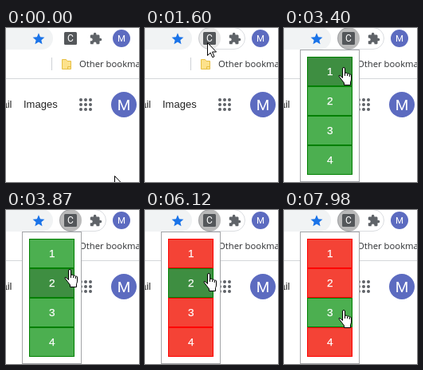
These frames come from a looping animation (167 by 193 pixels, 8000 ms). An HTML page:

```html
<!DOCTYPE html>
<html lang="en">
<head>
<meta charset="utf-8">
<title>Extension popup</title>
<style>
  html, body { margin: 0; width: 100%; height: 100%; overflow: hidden; background: #fff; }
  svg { display: block; width: 100vw; height: 100vh; }
  .ui { font: 11.3px "Open Sans", "Noto Sans", sans-serif; fill: #2b2d30; }
  .page { font: 13px "Liberation Sans", Arial, sans-serif; fill: #222; }
  .letter { font-family: Roboto, sans-serif; fill: #fff; text-anchor: middle; }
  .digit { font: 13.6px "Liberation Sans", Arial, sans-serif; fill: #fff; stroke: #fff; stroke-width: .25; text-anchor: middle; }
  .crisp { shape-rendering: crispEdges; }
</style>
</head>
<body>
<svg viewBox="0 0 167 193">
  <rect width="167" height="193" fill="#fff"/>

  <!-- toolbar -->
  <rect x="-40" y="-1" width="99" height="28" rx="14" fill="#f1f3f4"/>
  <path transform="translate(32.1 4.8) scale(.74)" fill="#1a73e8"
    d="M12 17.27 18.18 21l-1.64-7.03L22 9.24l-7.19-.61L12 2 9.19 8.63 2 9.24l5.46 4.73L5.82 21z"/>
  <rect id="pill" x="67.5" y="-.5" width="58" height="27" rx="13.5" fill="#fff" stroke="#dadce0"/>
  <circle id="ink" cx="81" cy="13" r="14" fill="#000"/>
  <rect x="73" y="5" width="16" height="16" rx="1.5" fill="#54575a"/>
  <text class="letter" x="81" y="17.3" font-size="12">C</text>
  <path transform="translate(104.4 5.1) scale(.69)" fill="#5f6368"
    d="M20.5 11H19V7c0-1.1-.9-2-2-2h-4V3.5C13 2.12 11.88 1 10.5 1S8 2.12 8 3.5V5H4c-1.1 0-1.99.9-1.99 2v3.8H3.5c1.49 0 2.7 1.21 2.7 2.7s-1.21 2.7-2.7 2.7H2V20c0 1.1.9 2 2 2h3.8v-1.5c0-1.49 1.21-2.7 2.7-2.7 1.49 0 2.7 1.21 2.7 2.7V22H17c1.1 0 2-.9 2-2v-4h1.5c1.38 0 2.5-1.12 2.5-2.5S21.88 11 20.5 11z"/>
  <circle cx="145" cy="13" r="11" fill="#5c6bc0"/>
  <text class="letter" x="145" y="17" font-size="11.5">M</text>

  <!-- bookmarks bar -->
  <rect class="crisp" x="57" y="37" width="1" height="16" fill="#cfd2d6"/>
  <path d="M70.5 39.5h5l1.5 2h4.5v10h-11z" fill="#fde28c" stroke="#e6bf45"/>
  <path d="M77.5 51.5v-3h4" fill="none" stroke="#e6bf45"/>
  <text class="ui" x="92" y="49">Other bookmarks</text>
  <rect class="crisp" y="63" width="167" height="1" fill="#d5d7da"/>

  <!-- page header -->
  <text class="page" x="7.5" y="100" text-anchor="end">ail</text>
  <text class="page" x="22" y="100">Images</text>
  <g id="dots" fill="#5f6368"></g>
  <circle cx="148" cy="96" r="16" fill="#5c6bc0"/>
  <text class="letter" x="148" y="102.7" font-size="19">M</text>

  <g id="popup">
    <rect class="crisp" x="20.5" y="27.5" width="74" height="165" fill="#fff" stroke="#a3a5a8"/>
    <g id="buttons"></g>
    <g id="focus" class="crisp" fill="none">
      <rect x="28.5" y="-.5" width="58" height="38" stroke="#fff"/>
      <rect x="29.5" y=".5" width="56" height="36" stroke="#101010"/>
    </g>
  </g>

  <path id="arrow" d="M.5 .5V16.5L4.2 13 6.7 18.7 9 17.8 6.5 12H11.5Z" fill="#fff" stroke="#000"/>
  <g id="hand" stroke="#000" stroke-linejoin="round">
    <path fill="#fff" d="M5.5 2Q5.5 .5 7 .5T8.5 2V8Q9 7 10 7T11.5 8.5Q12 7.7 13 8T14.3 9.5Q15 8.8 16 9.2T16.5 11V15Q16.5 17 15.5 18.5V22.5H7.5V20L3 14Q.5 11.5 1 10.7T3.5 11.5L5.5 13.5Z"/>
    <path fill="none" d="M8.5 8V11M11.5 9V11M14.3 10V12"/>
  </g>
</svg>
<script>
const LOOP = 8000, TICK = 76;
const TOP = 36, PITCH = 37;
const HOVER_ICON = 900, OPEN = 2390;
const EFFECT = 170; // delay from pressing a button to the recolouring

const PATH = [
  { start: 0, end: 0, x: 136, y: 185 },
  { start: 70, end: 830, x: 84, y: 34 },
  { start: 900, end: 1000, x: 81, y: 25 },
  { start: 1300, end: 1600, x: 78, y: 18 },
  { start: 3170, end: 3400, x: 75, y: 49 },
  { start: 3480, end: 3700, x: 80, y: 74 },
  { start: 6120, end: 6890, x: 75, y: 125 }
];
const CLICKS = [{ time: 4250, button: 1 }, { time: 7740, button: 2 }];

const GREEN = { base: "#4caf50", over: "#3e8e41", edge: "#008000" };
const RED = { base: "#f44336", over: "#da190b", edge: "#ff0000" };

const $ = id => document.getElementById(id);
const show = (el, on) => el.setAttribute("visibility", on ? "inherit" : "hidden");

function add(parent, tag, attrs, text = "") {
  const el = document.createElementNS("http://www.w3.org/2000/svg", tag);
  for (const key in attrs) el.setAttribute(key, attrs[key]);
  el.textContent = text;
  return parent.appendChild(el);
}

// 0 before start, then equal steps that reach 1 at end
function progress(t, start, end) {
  if (t < start) return 0;
  if (t >= end) return 1;
  const gaps = Math.max(1, Math.round((end - start) / TICK));
  return (Math.floor((t - start) / (end - start) * gaps + .05) + 1) / (gaps + 1);
}

function cursorAt(t) {
  let x = 0, y = 0;
  for (const leg of PATH) {
    const done = progress(t, leg.start, leg.end);
    x += (leg.x - x) * done;
    y += (leg.y - y) * done;
  }
  return { x: Math.round(x), y: Math.round(y) };
}

for (let i = 0; i < 9; i++)
  add($("dots"), "circle", { cx: 94 + i % 3 * 6, cy: 90 + Math.floor(i / 3) * 6, r: 2 });

const buttons = [0, 1, 2, 3].map(i => {
  const y = TOP + i * PITCH;
  const box = add($("buttons"), "rect", { class: "crisp", x: 29.5, y: y + .5, width: 56, height: PITCH - 1 });
  add($("buttons"), "text", { class: "digit", x: 57.8, y: y + 23 }, i + 1);
  return box;
});

function draw(t) {
  const { x, y } = cursorAt(t);
  const opened = progress(t, OPEN, OPEN + 150);
  const hovered = progress(t, HOVER_ICON, HOVER_ICON + 100);
  $("pill").setAttribute("opacity", hovered);
  $("ink").setAttribute("opacity", .09 * hovered + .18 * opened);
  $("popup").setAttribute("opacity", opened);

  // recoloured buttons lose their hover until the cursor moves again
  const pressed = CLICKS.find(c => t >= c.time && t < c.time + EFFECT);
  const chosen = CLICKS.filter(c => t >= c.time + EFFECT).pop();
  const moved = PATH.filter(leg => leg.start <= t).pop().start;
  const still = chosen && moved < chosen.time;
  const over = opened && !still ? Math.floor((y - TOP) / PITCH) : -1;

  buttons.forEach((box, i) => {
    const look = !chosen || chosen.button === i ? GREEN : RED;
    box.setAttribute("fill", i === over ? look.over : look.base);
    box.setAttribute("stroke", look.edge);
  });
  show($("focus"), pressed);
  if (pressed) $("focus").setAttribute("transform", `translate(0 ${TOP + pressed.button * PITCH})`);

  const pointing = opened && y >= TOP;
  show($("arrow"), !pointing);
  show($("hand"), pointing);
  $("arrow").setAttribute("transform", `translate(${x} ${y})`);
  $("hand").setAttribute("transform", `translate(${x - 7} ${y})`);
}

function tick() {
  draw(performance.now() % LOOP);
  requestAnimationFrame(tick);
}
tick();
</script>
</body>
</html>
```
